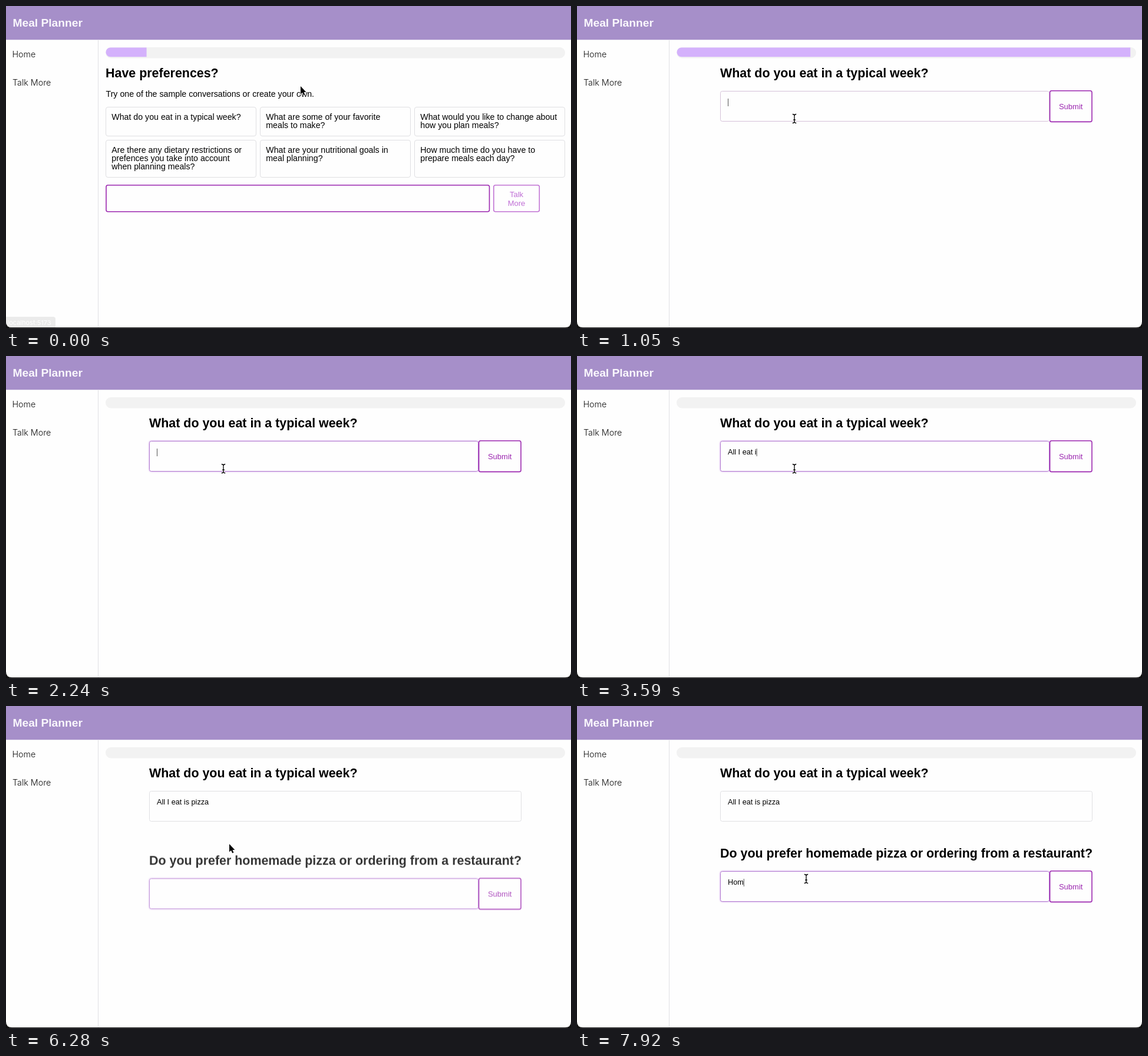
Animation, 959 px wide and 546 px high, one loop 8 s. Source, as an HTML page:

```html
<!DOCTYPE html>
<html lang="en">
<head>
<meta charset="utf-8">
<title>Meal Planner</title>
<style>
  html, body { margin: 0; width: 100%; height: 100%; overflow: hidden; background: #111; }
  svg { display: block; width: 959px; height: 546px; }
  text { font-family: "Liberation Sans", Arial, sans-serif; white-space: pre; }
  .ui { font-family: Inter, sans-serif; }
  .nav { font-size: 14.3px; font-weight: 300; fill: #111; }
  .head { font-size: 21.43px; font-weight: 700; }
  .body { font-size: 14.2px; }
  .typed { font-size: 12.7px; }
  .btn { font-size: 13px; text-anchor: middle; fill: #9c27b0; }
  .card { fill: #fefefe; stroke: #dfdfe2; }
  .strong { fill: #fefefe; stroke: #9c27b0; stroke-width: 1.6; }
  .light { stroke: #c173d4; }
  .btn.pale { fill: #c06fd6; }
  .field { fill: #fefefe; stroke: #e0e0e3; }
  .field.entering { stroke: #d5c2d9; }
  .field.focus { stroke: #b27bd0; filter: drop-shadow(0 0 1.5px #cf9ce8); }
  .caret { fill: #555; }
</style>
</head>
<body>
<svg viewBox="0 0 959 546">
  <path d="M0 0H959V535Q959 545 949 545H10Q0 545 0 535Z" fill="#fefefe"/>
  <path d="M156.5 57V545" stroke="#e1e1e4"/>
  <rect width="959" height="57" fill="#a68fc9"/>
  <path d="M0 57.5H959" stroke="#e6e0ef"/>
  <text x="11.5" y="34.5" font-size="19.2" font-weight="700" fill="#faf8fd">Meal Planner</text>
  <text class="ui nav" x="10.5" y="87">Home</text>
  <text class="ui nav" x="11" y="134.5">Talk More</text>

  <rect x="169" y="70" width="780" height="18.5" rx="9" fill="#f2f2f2"/>
  <clipPath id="track"><rect x="169.5" y="70.5" width="779" height="15.7" rx="7.8"/></clipPath>
  <rect id="bar" x="169" y="70" height="17" fill="#d4b1fc" clip-path="url(#track)"/>

  <g id="start">
    <text class="head" x="169" y="120.7">Have preferences?</text>
    <text class="body" x="169.5" y="154">Try one of the sample conversations or create your own.</text>
    <g id="cards"></g>
    <rect class="strong" x="170" y="303.8" width="650.5" height="45" rx="3"/>
    <rect class="strong light" x="827.8" y="303.8" width="77.5" height="45" rx="3"/>
    <text class="btn pale" x="866.5" y="324">Talk</text>
    <text class="btn pale" x="866.5" y="339.3">More</text>
  </g>
  <g id="status">
    <path d="M0 527H80Q84 527 84 531V545H10Q0 545 0 535Z" fill="#ebebeb"/>
    <text class="ui" x="2.5" y="540.5" font-size="11" fill="#fff">localhost:5173</text>
  </g>
  <g id="chat"></g>

  <g id="arrow" stroke-linejoin="round">
    <path d="M0 0V13.5L3 10.8 5.2 15.4 7.5 14.4 5.4 9.9H9.4Z" stroke="#fff" stroke-width="1.8"/>
    <path d="M0 0V13.5L3 10.8 5.2 15.4 7.5 14.4 5.4 9.9H9.4Z"/>
  </g>
  <g id="beam" fill="none">
    <path d="M-3.2 -7.5Q0 -7.5 0 -5Q0 -7.5 3.2 -7.5M0 -5.5V5.5M-3.2 7.5Q0 7.5 0 5Q0 7.5 3.2 7.5M-1.8 2H1.8" stroke="#fff" stroke-width="3"/>
    <path d="M-3.2 -7.5Q0 -7.5 0 -5Q0 -7.5 3.2 -7.5M0 -5.5V5.5M-3.2 7.5Q0 7.5 0 5Q0 7.5 3.2 7.5M-1.8 2H1.8" stroke="#000" stroke-width="1.3"/>
  </g>
</svg>
<script>
const LOOP = 8000, TICK = 149.43;
const $ = id => document.getElementById(id);
const show = (el, on) => { el.style.display = on ? '' : 'none'; };

function add(parent, tag, attrs, text = '') {
  const el = document.createElementNS('http://www.w3.org/2000/svg', tag);
  for (const name in attrs) el.setAttribute(name, attrs[name]);
  el.textContent = text;
  return parent.appendChild(el);
}

// Cubic timing curve, solved by bisection
function bezier(x1, y1, x2, y2) {
  const at = (a, b, s) => 3 * a * s * (1 - s) ** 2 + 3 * b * s * s * (1 - s) + s ** 3;
  return t => {
    if (t <= 0) return 0;
    if (t >= 1) return 1;
    let lo = 0, hi = 1;
    for (let i = 0; i < 24; i++) {
      const mid = (lo + hi) / 2;
      if (at(x1, x2, mid) < t) lo = mid; else hi = mid;
    }
    return at(y1, y2, lo);
  };
}
const ease = bezier(.25, .1, .25, 1), easeInOut = bezier(.42, 0, .58, 1);

const cards = [
  ['What do you eat in a typical week?'],
  ['What are some of your favorite', 'meals to make?'],
  ['What would you like to change about', 'how you plan meals?'],
  ['Are there any dietary restrictions or', 'prefences you take into account', 'when planning meals?'],
  ['What are your nutritional goals in', 'meal planning?'],
  ['How much time do you have to', 'prepare meals each day?']
];
cards.forEach((lines, i) => {
  const x = 169.5 + 262 * (i % 3), y = i < 3 ? 171.5 : 227.5;
  add($('cards'), 'rect', { class: 'card', x, y, width: 255, height: i < 3 ? 49 : 63, rx: 3.5 });
  lines.forEach((line, n) =>
    add($('cards'), 'text', { class: 'body', x: x + 9.8, y: y + 21 + 14.4 * n }, line));
});

function question(title) {
  const g = add($('chat'), 'g', {});
  add(g, 'text', { class: 'head', x: 243, y: 120.7 }, title);
  const field = add(g, 'rect', { x: 243.5, y: 144.5, height: 51, rx: 3 });
  const submit = add(g, 'g', {});
  add(submit, 'rect', { class: 'strong', x: 802.6, y: 143.8, width: 71.4, height: 52.6, rx: 3 });
  add(submit, 'text', { class: 'btn', x: 838.2, y: 174.5 }, 'Submit');
  const typed = add(g, 'text', { class: 'typed', x: 256, y: 167 });
  const caret = add(g, 'rect', { class: 'caret', y: 157, width: 1, height: 13 });
  return { g, field, submit, typed, caret };
}
function setQuestion(q, { text, state, open, caret }) {
  q.typed.textContent = text;
  q.field.setAttribute('class', 'field ' + state);
  q.field.setAttribute('width', open ? 558 : 631);
  show(q.submit, open);
  show(q.caret, caret);
  q.caret.setAttribute('x', 256 + (text ? q.typed.getComputedTextLength() : 0));
}
const first = question('What do you eat in a typical week?');
const second = question('Do you prefer homemade pizza or ordering from a restaurant?');

// Ticks at which each further character appears
const keys1 = [16, 17, 18, 19, 20, 21, 22, 23, 23, 24, 24, 25, 26, 27, 29, 29, 30, 32];
const keys2 = [50, 52, 53];
const type = (text, keys, k) => text.slice(0, keys.filter(n => n <= k).length);

// Pointer stops: tick, x, y
const path = [
  [0, 500, 136], [1, 484, 143], [3, 416, 172], [5, 372, 189], [6, 369, 191],
  [35, 369, 191], [37, 369, 195], [38, 370, 211], [40, 375, 226], [42, 379, 234],
  [44, 386, 268], [46, 389, 293], [54, 389, 293]
];
function pointer(k) {
  const i = path.findIndex(p => p[0] > k);
  const [a, x, y] = path[i - 1], [b, u, v] = path[i], f = (k - a) / (b - a);
  return [x + (u - x) * f, y + (v - y) * f];
}

function draw(time) {
  const k = Math.min(53, Math.floor((time + 4) / TICK)), t = k * TICK;
  const chatting = k >= 7;
  show($('start'), !chatting);
  show($('status'), k < 1);
  show($('chat'), chatting);

  const left = 1 - easeInOut((t - (chatting ? 982 : -633)) / 800);
  $('bar').setAttribute('width', 780 * left);

  const sent = k >= 35;
  setQuestion(first, {
    text: type('All I eat is pizza', keys1, k),
    state: k === 7 ? 'entering' : k < 38 ? 'focus' : '',
    open: !sent,
    caret: !sent && (k < 11 || k >= 15)
  });

  const rise = ease((t - 5780) / 1000);
  show(second.g, rise > 0);
  second.g.setAttribute('transform', `translate(0 ${136 + 61 * (1 - rise)})`);
  second.g.setAttribute('opacity', rise);
  setQuestion(second, { text: type('Homemade', keys2, k), state: 'focus', open: true, caret: k >= 46 });

  const [x, y] = pointer(k), beam = k >= 7 && k < 38 || k >= 45;
  show($('beam'), beam);
  show($('arrow'), !beam);
  $(beam ? 'beam' : 'arrow').setAttribute('transform', `translate(${x} ${y})`);
}

const begin = performance.now();
function loop() {
  draw((performance.now() - begin) % LOOP);
  requestAnimationFrame(loop);
}
loop();
</script>
</body>
</html>
```
